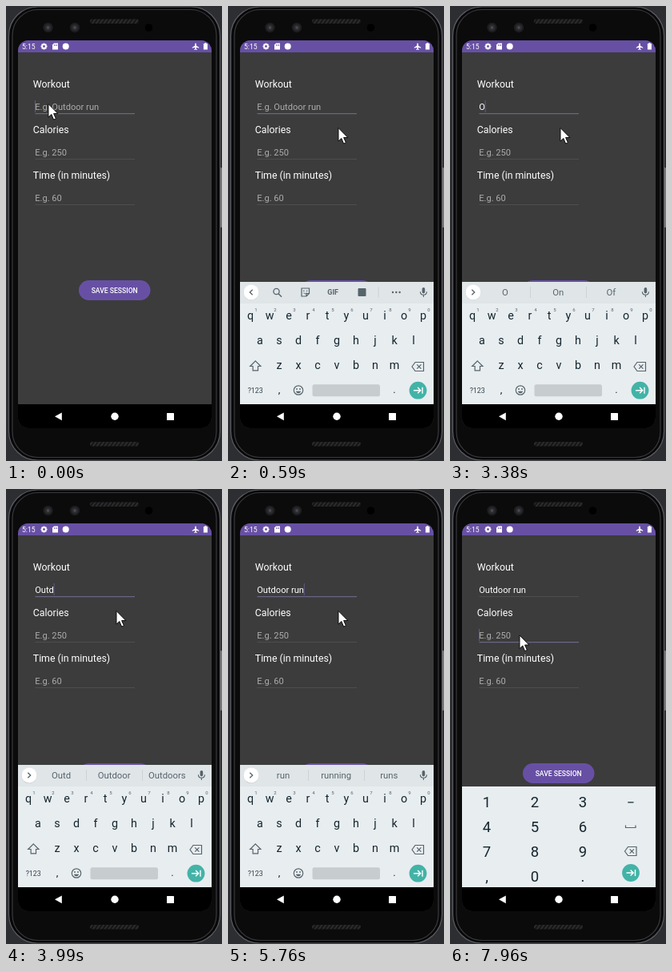
Write an HTML page that moves like this. It is 270x569 px and loops after 8000 ms.

```html
<!DOCTYPE html>
<html lang="en">
<head>
<meta charset="utf-8">
<title>Workout form</title>
<style>
  html, body { margin: 0; width: 100%; height: 100%; overflow: hidden; background: #2d2e32; }
  svg { display: block; width: 100%; height: 100%; font-family: Roboto, sans-serif; }
  text { white-space: pre; }
</style>
</head>
<body>
<svg id="stage" viewBox="0 0 270 569"></svg>
<script>
const LOOP = 8000;
const PURPLE = '#6750a4', INK = '#14262e', GREY = '#56646b', TEAL = '#43b3a7', HINT = '#acacac';
const FIELD_SIZE = 11.1, FIELD_X = 36.2;
const FIELD_Y = [130, 187, 244];

const text = (x, y, size, str, fill, extra = '') =>
  `<text x="${x}" y="${y}" font-size="${size}" fill="${fill}" ${extra}>${str}</text>`;
const mid = (x, y, size, str, fill, extra = '') =>
  text(x, y, size, str, fill, 'text-anchor="middle" ' + extra);
const rect = (x, y, w, h, fill, r = 0, extra = '') =>
  `<rect x="${x}" y="${y}" width="${w}" height="${h}" rx="${r}" fill="${fill}" ${extra}/>`;
const circle = (x, y, r, fill, extra = '') =>
  `<circle cx="${x}" cy="${y}" r="${r}" fill="${fill}" ${extra}/>`;
const line = (d, color, w = 1.2) =>
  `<path d="${d}" fill="none" stroke="${color}" stroke-width="${w}"/>`;
const shape = (d, fill) => `<path d="${d}" fill="${fill}"/>`;
const group = (id, body, extra = '') => `<g id="${id}" ${extra}>${body}</g>`;
const at = (x, y, body) => `<g transform="translate(${x} ${y})">${body}</g>`;

function phone() {
  const grille = y => rect(105, y, 61, 5.5, '#161617', 2.7) + rect(105, y, 61, 5.5, 'url(#hatch)', 2.7);
  const lens = x => circle(x, 27, 6.2, '#1d1d1f') + circle(x, 27, 4, '#2b2c2f') + circle(x, 27, 1.7, '#4a4b4f');
  return rect(267, 202, 3, 75, '#77787b', 1) +
    rect(3.5, 1, 264, 567, '#08080a', 36, 'stroke="#5c5d60" stroke-width="1.2"') +
    rect(8, 4.5, 255, 560, '#0b0b0c', 32, 'stroke="#3a3a3d" stroke-width="1.2"') +
    grille(16.5) + grille(545) + lens(52.5) + lens(86) + circle(178.5, 27, 4.8, '#000');
}

function statusBar() {
  let teeth = '';
  for (let a = 0; a < 360; a += 45) teeth += `<rect x="-.9" y="-4" width="1.8" height="2" fill="#fff" transform="rotate(${a})"/>`;
  return rect(15, 43, 242, 15, PURPLE) +
    text(20, 54, 8.6, '5:15', '#fff') +
    at(47.5, 50.5, teeth + circle(0, 0, 2.3, 'none', 'stroke="#fff" stroke-width="1.7"')) +
    shape('M60 46.5h5v8h-7v-6z', '#fff') + line('M60.4 48v2M62 48v2M63.6 48v2', PURPLE, .7) +
    circle(74.7, 50.5, 4, '#fff') +
    shape('M237 46.5q.8 0 .8 1v2l3.4 2.2v1l-3.4-1v1.8l1 .8v.7l-1.8-.5-1.8.5v-.7l1-.8v-1.8l-3.4 1v-1l3.4-2.2v-2q0-1 .8-1z', '#fff') +
    shape('M248.4 46h2v.9h1.5v7.6h-5v-7.6h1.5z', '#fff');
}

function form() {
  const labels = ['Workout', 'Calories', 'Time (in minutes)'];
  return labels.map((s, i) =>
    text(33.8, 102.3 + 57 * i, 12.3, s, '#fff') +
    text(FIELD_X, FIELD_Y[i], FIELD_SIZE, '', HINT, `id="field${i}"`) +
    `<rect id="rule${i}" x="36.5" width="124.5"/>`).join('') +
    rect(0, 118, 1, 15, '#62598a', 0, 'id="caret"') +
    rect(91, 343, 89.5, 25, PURPLE, 12.5) +
    mid(135.7, 358.6, 8.6, 'SAVE SESSION', '#fff', 'font-weight="500"');
}

const backspace = (x, y) => at(x, y,
  line('M-7.5 0L-3.5-5.5H7V5.5H-3.5z', GREY) + line('M-1.3-2.6L3.9 2.6M3.9-2.6L-1.3 2.6', GREY));
const enter = (x, y) => at(x, y, circle(0, 0, 10.9, TEAL) + line('M-5.5 0H3M-.4-3.6L3.2 0L-.4 3.6M5.5-4V4', '#fff', 1.4));

function letters() {
  const row = (keys, x, y) => [...keys].map((k, i) => mid(x + 24 * i, y, 14.3, k, INK)).join('');
  const digits = [...'1234567890'].map((d, i) => mid(35 + 24 * i, 382.3, 6, d, GREY)).join('');
  return rect(15, 372, 242, 126, '#e8edf0') + digits +
    row('qwertyuiop', 28, 392) + row('asdfghjkl', 40, 423) + row('zxcvbnm', 64, 454) +
    line('M34.3 443.8l6.6 6.7h-3.4v5.4h-6.4v-5.4h-3.4z', GREY) + backspace(237.5, 451) +
    mid(34.2, 484, 8.8, '?123', '#33434b') + mid(64, 484, 13, ',', INK) + mid(208, 484, 13, '.', INK) +
    circle(88, 480.5, 5.7, 'none', `stroke="${GREY}" stroke-width="1.2"`) +
    circle(86, 479, .9, GREY) + circle(90, 479, .9, GREY) + shape('M84.8 481.8h6.4q-1 2.5-3.2 2.5t-3.2-2.5z', GREY) +
    rect(105.5, 473.3, 84.5, 15, '#c7cccf', 2.5) + enter(237.5, 480.7);
}

function strip() {
  const tools =
    circle(60.5, 357, 3.6, 'none', `stroke="${GREY}" stroke-width="1.3"`) + line('M63 359.7l4 4', GREY, 1.4) +
    line('M92 353h9.5v6.5l-3.5 3.5h-6z M98 363v-3.5h3.5', GREY) +
    circle(94.8, 356.3, .8, GREY) + circle(98.6, 356.3, .8, GREY) + line('M94.4 358.8q2.2 2 4.3 0', GREY, .9) +
    mid(131.2, 361.2, 9, 'GIF', GREY, 'font-weight="700"') +
    rect(162.5, 353, 10, 10, GREY, 1) +
    rect(187.7, 351.5, .7, 13, '#c4cacd') +
    [206, 210.3, 214.6].map(x => circle(x, 358, 1.2, GREY)).join('');
  const words = [69, 135.2, 201.3].map((x, i) => mid(x, 362.3, 11.3, '', GREY, `id="word${i}"`)).join('') +
    rect(100, 351, .7, 14, '#c4cacd') + rect(170, 351, .7, 14, '#c4cacd');
  return rect(15, 345, 242, 27, '#e0e5e8') +
    circle(29, 358.5, 9.7, '#c9ced1') + circle(29, 358, 9.5, '#fff') +
    '<path id="chevron" d="M-1.7-3.3L1.7 0L-1.7 3.3" fill="none" stroke="#56646b" stroke-width="1.3"/>' +
    group('tools', tools) + group('words', words) +
    rect(242.6, 352, 3.6, 7.4, GREY, 1.8) + line('M240.4 357.2q0 4 4 4t4-4M244.4 361v3', GREY, 1.1);
}

function numpad() {
  const rows = ['123', '456', '789', ',0.'];
  return rect(15, 372, 242, 126, '#e8edf0') +
    rows.map((keys, r) => [...keys].map((k, c) => mid(46 + 60 * c, 398.2 + 30.8 * r, 18.5, k, INK)).join('')).join('') +
    line('M222.3 391.8h7.2', INK, 1.2) + line('M219.5 420.5v3h12.5v-3', GREY) +
    backspace(226, 453) + enter(226, 480);
}

const nav = rect(15, 498, 242, 31, '#000') +
  shape('M61 513.3l8.8-4.9v9.8z', '#fff') + circle(136, 513.3, 4.7, '#fff') + rect(201, 509, 9, 9, '#fff', .6);

const stage = document.getElementById('stage');
stage.innerHTML = `<defs>
  <clipPath id="screen"><rect x="15" y="43" width="242" height="485" rx="13"/></clipPath>
  <pattern id="hatch" width="4" height="4" patternUnits="userSpaceOnUse" patternTransform="rotate(35)">
    <rect width="1.6" height="4" fill="#303032"/></pattern></defs>` +
  rect(0, 0, 270, 569, '#2d2e32') + phone() +
  group('view', rect(15, 43, 242, 486, '#3c3c3c') + statusBar() + form() + nav +
    group('keyboard', letters() + strip()) + group('numpad', numpad()), 'clip-path="url(#screen)"') +
  group('mouse', '<path d="M0 0V16.6L3.8 13L6.6 19.6L9.4 18.4L6.6 12H11.8Z" fill="#fff" stroke="#000" stroke-width=".9"/>');

const el = {};
stage.querySelectorAll('[id]').forEach(n => el[n.id] = n);
const show = (node, on) => node.setAttribute('visibility', on ? 'inherit' : 'hidden');

const ruler = document.createElement('canvas').getContext('2d');
ruler.font = FIELD_SIZE + 'px Roboto, sans-serif';

// Each track lists [start ms, ...values], held until the next entry.
const MOUSE = [[0, 53, 122.5], [290, 87, 131], [440, 117, 140], [590, 138, 152.5], [6200, 134, 155],
  [6350, 122, 163], [6500, 106, 172], [6640, 94, 179], [6790, 87, 183]];
const TYPED = [[0, ''], [3380, 'O'], [3530, 'Ou'], [3680, 'Out'], [3990, 'Outd'], [4140, 'Outdo'],
  [4290, 'Outdoor'], [4610, 'Outdoor '], [5490, 'Outdoor r'], [5620, 'Outdoor ru'], [5760, 'Outdoor run']];
const WORDS = [[0, '', '', ''], [3380, 'O', 'On', 'Of'], [3530, 'Ou', 'Our', 'Out'], [3680, 'Out', 'Our', 'Outs'],
  [3990, 'Outd', 'Outdoor', 'Outdoors'], [4290, 'Outdoor', 'Outdoors', 'Outdoor'],
  [4610, 'and', 'activities', 'seating'], [5490, 'r', 'run', 'room'], [5620, 'ru', 'run', 'rug'],
  [5760, 'run', 'running', 'runs']];
const CARET = [[0, true], [590, false], [1180, true], [1620, false], [2070, true], [2660, false], [3100, true],
  [5060, false], [5490, true], [6350, false], [6790, true], [7520, false], [7960, true]];
const hold = (track, t) => track.filter(k => k[0] <= t).pop().slice(1);

function draw(t) {
  const [typed] = hold(TYPED, t);
  const focus = t < 6930 ? 0 : 1;
  const rising = t < 590;
  const typing = t >= 3380;

  const [mx, my] = hold(MOUSE, t);
  el.mouse.setAttribute('transform', `translate(${mx} ${my})`);

  el.field0.textContent = typed || 'E.g. Outdoor run';
  el.field0.setAttribute('fill', typed ? '#fff' : HINT);
  el.field1.textContent = 'E.g. 250';
  el.field2.textContent = 'E.g. 60';
  for (let i = 0; i < 3; i++) {
    const on = i === focus, rule = el['rule' + i];
    rule.setAttribute('y', 134 + 57 * i);
    rule.setAttribute('height', on ? 1.2 : .7);
    rule.setAttribute('fill', on ? '#6c6685' : '#565656');
  }
  el.caret.setAttribute('x', focus ? 36 : 36 + ruler.measureText(typed).width);
  el.caret.setAttribute('y', 118 + 57 * focus);
  show(el.caret, hold(CARET, t)[0]);

  show(el.keyboard, t >= 440 && t < 7080);
  el.keyboard.setAttribute('transform', `translate(0 ${rising ? 8 : 0})`);
  el.keyboard.setAttribute('opacity', rising ? .86 : 1);
  show(el.numpad, t >= 7080);
  show(el.tools, !rising && !typing);
  show(el.words, typing);
  hold(WORDS, t).forEach((w, i) => el['word' + i].textContent = w);
  el.chevron.setAttribute('transform', `translate(29 358) scale(${rising || typing ? 1 : -1} 1)`);
}

function tick() {
  draw(performance.now() % LOOP);
  requestAnimationFrame(tick);
}
tick();
</script>
</body>
</html>
```
